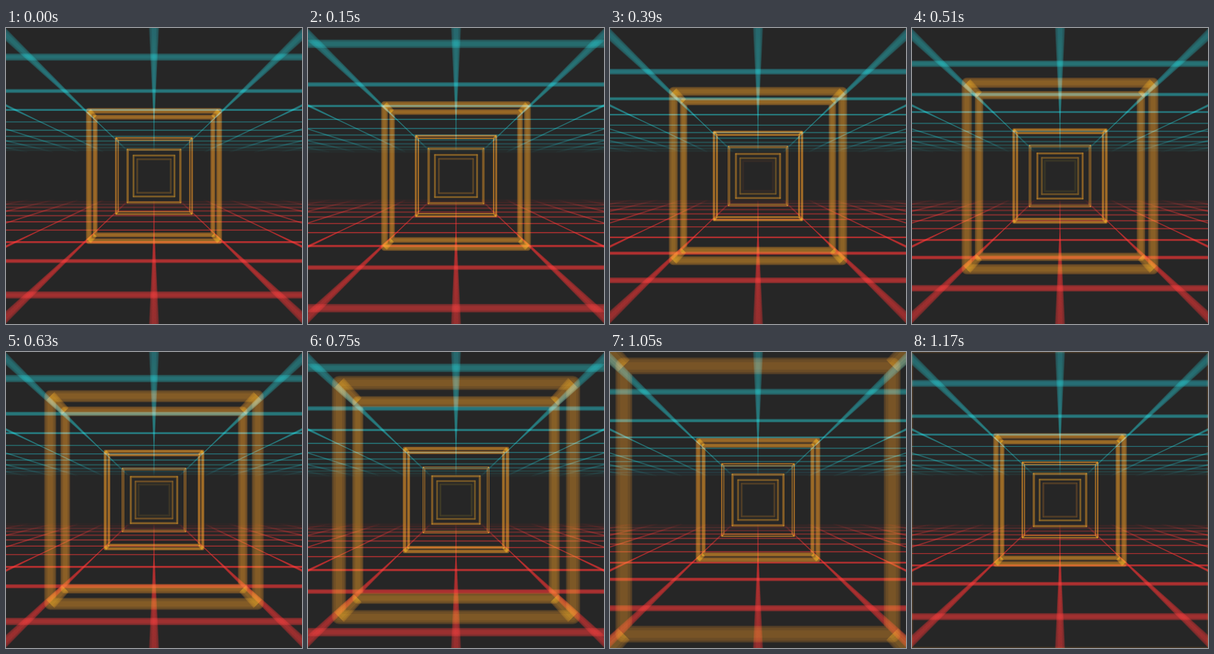
Animation of 400 by 400 pixels, one loop 1200 ms. Source, as an HTML page with a canvas:

```html
<!DOCTYPE html>
<html>
<head>
<meta charset="utf-8">
<style>
  html, body { margin: 0; width: 100%; height: 100%; overflow: hidden; background: #262626; }
  canvas { display: block; }
</style>
</head>
<body>
<canvas id="stage" width="400" height="400"></canvas>
<script>
const ctx = document.getElementById('stage').getContext('2d');
const LOOP = 1200, STEP = 30, LAYERS = 5;
const RED = [180, 12, 12], TEAL = [0, 108, 114], ORANGE = [160, 93, 0];
const FLOOR = 201, CELL = 211, BOX = 124, BOX_DEPTH = 0.15;

// Depth of field: blur grows away from the focal plane, faster in front of it.
const FOCUS = 2.75;
const blur = z => (z < FOCUS ? 20 : 7) * Math.abs(1 / z - 1 / FOCUS);
const width = z => 1.2 + blur(z);
const layerWidth = j => Math.sqrt(1 - ((j + 0.5) / LAYERS) ** 2);

// Colour of one layer; all layers screened together give the full shade.
function shade(color, z) {
  const fog = Math.max(0, Math.min(1, (6.3 - z) / 3.8));
  const gain = fog / (1 + 0.03 * blur(z));
  const parts = color.map(v => 255 * (1 - (1 - v * gain / 255) ** (1 / LAYERS)));
  return `rgb(${parts.map(v => v.toFixed(2)).join(' ')})`;
}

// Outline parallel to the screen, at depth z.
function flatPath(path, z, color) {
  ctx.strokeStyle = shade(color, z);
  for (let j = 0; j < LAYERS; j++) {
    ctx.lineWidth = width(z) * layerWidth(j);
    ctx.stroke(path);
  }
}

// Line running into the distance through (x, y), from depth near to far.
function deepLine(x, y, near, far, color) {
  const gradient = ctx.createLinearGradient(x / near, y / near, x / far, y / far);
  const length = Math.hypot(x, y), nx = -y / length / 2, ny = x / length / 2;
  const n = 24, points = [];
  for (let i = 0; i <= n; i++) {
    const z = 1 / (1 / near + (1 / far - 1 / near) * i / n);
    gradient.addColorStop(i / n, shade(color, z));
    points.push(z);
  }
  ctx.fillStyle = gradient;
  for (let j = 0; j < LAYERS; j++) {
    const edge = side => z => {
      const w = width(z) * layerWidth(j) * side;
      ctx.lineTo(x / z + nx * w, y / z + ny * w);
    };
    ctx.beginPath();
    points.forEach(edge(1));
    points.slice().reverse().forEach(edge(-1));
    ctx.fill();
  }
}

function plane(side, color, phase) {
  for (let i = -9; i <= 9; i++) deepLine(i * CELL, side * FLOOR, 0.7, 6.3, color);
  for (let z = 1.25 - phase % 0.5; z < 6.3; z += 0.5) {
    for (const depth of z < 1.25 && z > 1.2 ? [z] : [z]) {
      const line = new Path2D();
      line.moveTo(-230, side * FLOOR / depth);
      line.lineTo(230, side * FLOOR / depth);
      flatPath(line, depth, color);
    }
  }
}

function square(z) {
  if (z < 0.5) return;
  const h = BOX / z, outline = new Path2D();
  outline.rect(-h, -h, 2 * h, 2 * h);
  flatPath(outline, z, ORANGE);
}

function box(z) {
  square(z);
  square(z + BOX_DEPTH);
  for (const sx of [-1, 1])
    for (const sy of [-1, 1]) deepLine(sx * BOX, sy * BOX, z, z + BOX_DEPTH, ORANGE);
}

function draw(phase) {
  ctx.setTransform(1, 0, 0, 1, 0, 0);
  ctx.globalCompositeOperation = 'source-over';
  ctx.fillStyle = '#262626';
  ctx.fillRect(0, 0, 400, 400);
  ctx.globalCompositeOperation = 'screen';
  ctx.lineJoin = 'round';
  ctx.translate(200, 200);
  plane(-1, TEAL, phase);
  plane(1, RED, phase);
  for (let z = 1.409 - phase; z < 6.3; z++) box(z);
}

function tick() {
  const time = performance.now() % LOOP;
  draw(Math.floor(time / STEP) * STEP / LOOP);
  requestAnimationFrame(tick);
}
tick();
</script>
</body>
</html>
```
